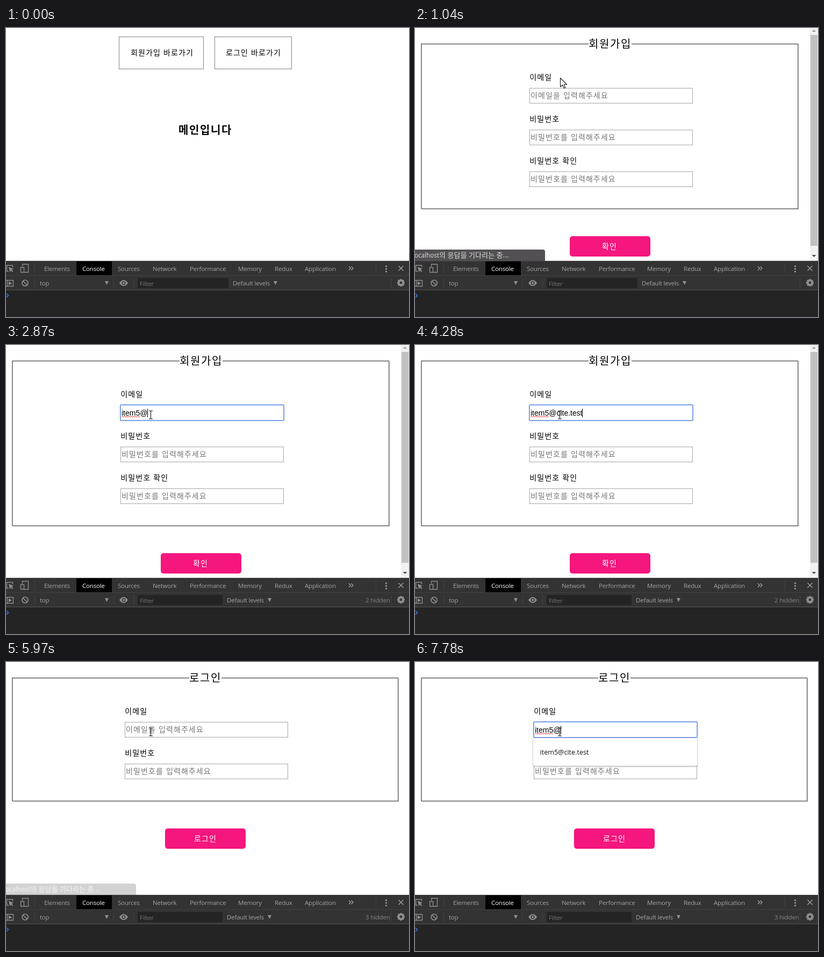
Animation of 750x540 px, one loop 8 s. Source, as an HTML page:

```html
<!DOCTYPE html>
<html lang="ko">
<head>
<meta charset="utf-8">
<style>
  html, body { margin: 0; width: 100%; height: 100%; overflow: hidden; background: #fff; }
  svg { display: block; }
  text { white-space: pre; }
  .ko { font-family: 'Noto Sans CJK KR', 'Noto Sans CJK', sans-serif; font-size: 14px; letter-spacing: 1.1px; }
  .big { font-size: 20px; letter-spacing: 1.6px; }
  .ui { font-family: 'Open Sans', 'Noto Sans', sans-serif; font-size: 11.5px; letter-spacing: -.2px; fill: #a3a3a3; }
  .item { font-family: 'Open Sans', 'Noto Sans', sans-serif; font-size: 12.6px; fill: #111; }
  .status { font-family: 'Open Sans', 'Noto Sans', sans-serif; font-size: 11.7px; fill: #dedede; }
  .status tspan { font-family: 'Noto Sans CJK KR', sans-serif; font-size: 13px; }
  .value { font-family: 'Liberation Sans', Arial, sans-serif; font-size: 14px; }
  .drop { filter: drop-shadow(0 1px 1.5px rgba(0,0,0,.4)); }
</style>
</head>
<body>
<svg width="750" height="540" viewBox="0 0 750 540">
  <g id="page"></g>
  <g id="tools"></g>
  <g id="pointer"></g>
</svg>
<script>
const LOOP = 8000;
const $ = id => document.getElementById(id);

// Markup helpers
const rect = (x, y, w, h, attrs) => `<rect x="${x}" y="${y}" width="${w}" height="${h}" ${attrs}/>`;
const frame = (x, y, w, h, color, attrs = '') =>
  rect(x + .5, y + .5, w - 1, h - 1, `fill="none" stroke="${color}" ${attrs}`);
const text = (x, y, str, cls, attrs = '') => `<text x="${x}" y="${y}" class="${cls}" ${attrs}>${str}</text>`;
const path = (d, attrs) => `<path d="${d}" ${attrs}/>`;

const pen = document.createElement('canvas').getContext('2d');
pen.font = "14px 'Liberation Sans', Arial, sans-serif";
const widthOf = str => pen.measureText(str).width;

// Timeline: each step patches the state from its time on
const typing = (before, chars, times) =>
  times.map((t, i) => [t, { value: before + chars.slice(0, i + 1), caret: 1 }]);
const USER = 'item5', HOST = 'cite.test';
const SAVED = ['demo4@cite.test', 'eee@nn.xx', 'rkvmsdhqt@sono.test', '456@ee.nn', 'demo@cite.test', 'wordly@river.test'];
const PAIR = ['item4@' + HOST, USER + '@' + HOST];
const WAITING = 'localhost<tspan>의 응답을 기다리는 중...</tspan>';

const fadeOut = (...times) => times.map((t, i) => [t, { fade: [.8, .5, .25, 0][i] }]);

const STEPS = [
  [0, { page: 'main', focus: -1, value: '', caret: 0, list: [], dots: [0, 0, 0], hidden: 0, status: '', fade: 0 }],
  [620, { status: 'localhost:3000/signup', fade: .4 }],
  [660, { fade: 1 }],
  [905, { page: 'signup', status: WAITING }],
  [1100, { hidden: 2 }],
  ...fadeOut(1105, 1135, 1170, 1200),
  [1250, { focus: 0, caret: 1 }],
  [1300, { list: SAVED }],
  [1660, { caret: 0 }],
  ...typing('', 'item', [1850, 1930, 2020, 2110]),
  [1870, { list: PAIR.slice(0, 1) }],
  [2400, { value: USER, list: [] }],
  [2740, { caret: 0 }],
  [2870, { value: USER + '@', caret: 1 }],
  [3220, { caret: 0 }],
  ...typing(USER + '@', HOST, [3480, 3570, 3660, 3740, 3830, 3990, 4090, 4180, 4280]),
  [4460, { focus: 1 }],
  [4600, { dots: [0, 1, 0] }],
  [4710, { focus: 2 }],
  [4820, { dots: [0, 1, 1] }],
  [4960, { focus: 3 }],
  [5700, { page: 'login', focus: -1, value: '', caret: 0, dots: [0, 0, 0] }],
  [5720, { status: WAITING, fade: 1 }],
  [5900, { hidden: 3 }],
  ...fadeOut(5901, 5935, 5970, 6000),
  [6220, { focus: 0, caret: 1 }],
  ...typing('', USER, [6570, 6670, 6760, 6870, 7080]),
  [6600, { list: PAIR }],
  [7170, { list: PAIR.slice(1) }],
  [7490, { caret: 0 }],
  [7780, { value: USER + '@', caret: 1 }],
].sort((a, b) => a[0] - b[0]);

let merged = {};
const STATES = STEPS.map(([time, patch]) => (merged = { ...merged, ...patch, time }));

// Pages
const linkBox = (x, w, label, tx) =>
  frame(x, 16, w, 61, '#000', 'stroke-dasharray="1 1"') + text(tx, 51, label, 'ko');

const mainPage = () =>
  linkBox(210, 158, '회원가입 바로가기', 232) + linkBox(388, 144, '로그인 바로가기', 409) +
  text(321, 198, '메인입니다', 'ko big', 'font-weight="700"');

const FORMS = {
  signup: { title: '회원가입', tx: 323, tw: 80, right: 714, x: 213, fields: ['이메일', '비밀번호', '비밀번호 확인'], button: '확인', bx: 348 },
  login: { title: '로그인', tx: 341, tw: 60, right: 731, x: 221, fields: ['이메일', '비밀번호'], button: '로그인', bx: 350 },
};

function field(s, x, label, i) {
  const y = 112 + 78 * i, focused = s.focus === i;
  const value = i ? '•'.repeat(s.dots[i]) : s.value;
  let out = text(x + .3, y - 15, label, 'ko') + frame(x, y, 304, 29, focused ? '#9bb8ec' : '#a5a5a5');
  if (focused) out += frame(x - 1, y - 1, 306, 31, '#5b8be0', 'rx="1"');
  out += value
    ? text(x + 2, y + 20, value, 'value')
    : text(x + 2, y + 19, (i ? '비밀번호를' : '이메일을') + ' 입력해주세요', 'ko', 'fill="#757575"');
  if (!i && value.includes('@')) {
    let zigzag = `M${x + 2} 135`;
    for (let k = 2; k <= 34; k += 2) zigzag += `L${x + 2 + k} ${k % 4 ? 133 : 135}`;
    out += path(zigzag, 'fill="none" stroke="#e33" stroke-width="1"');
  }
  if (focused && s.caret) out += rect(Math.floor(x + 2 + widthOf(value)), y + 7, 1, 16, '');
  return out;
}

function suggestions(list, x) {
  if (!list.length) return '';
  return rect(x - 1, 142, 305, 16 + 36 * list.length, 'rx="2" fill="#fff" class="drop"') +
    list.map((mail, i) => text(x + 11.5, 173 + 36 * i, mail, 'item')).join('');
}

const scrollbar = () =>
  rect(735, 0, 15, 435, 'fill="#f1f1f1"') + rect(736, 13, 13, 394, 'fill="#c1c1c1"') +
  path('M738.5 7l4-4 4 4z', 'fill="#a3a3a3"') + path('M738.5 424h8l-4 4z', 'fill="#505050"');

function formPage(s) {
  const f = FORMS[s.page], n = f.fields.length, w = f.right - 12, h = 78 * n + 75;
  const bx = f.x + 75, by = 155 + 78 * n;
  return frame(12, 30, w, h, '#a3a3a3') + frame(11, 29, w, h, '#6b6b6b') +
    rect(f.tx, 26, f.tw, 8, 'fill="#fff"') + text(f.tx, 37, f.title, 'ko big') +
    f.fields.map((label, i) => field(s, f.x, label, i)).join('') +
    rect(bx, by, 150, 38, 'rx="5" fill="#f5167e"') +
    (s.focus === 3 ? frame(bx - 1, by - 1, 152, 40, '#5b8be0', 'rx="5"') : '') +
    text(f.bx, by + 24, f.button, 'ko', 'fill="#fff"') +
    suggestions(s.list, f.x) + (s.page === 'signup' ? scrollbar() : '');
}

const statusBubble = s => s.fade
  ? `<g opacity="${s.fade}">${path('M0 414H238q4 0 4 4V435H0z', 'fill="#525052"')}${text(-4, 429, s.status, 'status')}</g>`
  : '';

// Developer tools
const TABS = [[71, 'Elements'], [142, 'Console'], [208, 'Sources'], [273, 'Network'], [342, 'Performance'],
  [432, 'Memory'], [500, 'Redux'], [556, 'Application']];

function icons() {
  const teeth = [0, 45, 90, 135].map(a => rect(733.2, 469, 3.6, 14, `fill="#919191" transform="rotate(${a} 735 476)"`)).join('');
  const dots = [445, 450, 455].map(y => `<circle cx="707.5" cy="${y}" r="1.6" fill="#a3a3a3"/>`).join('');
  const lines = 'fill="none" stroke="#919191" stroke-width="1.3"';
  return path('M5 454.5H1.5V443.500H12.500V447', lines) + path('M5 446.500l9 3.500-3.600 1.500 3 3-1.400 1.400-3-3-1.500 3.600z', 'fill="#919191"') +
    path('M30.500 446V441.500H41.500V456.500H34M27.500 447.500h6v9h-6z', lines) +
    path('M-2 471.500H13.500V482.500H-2M2.500 471V483', lines) + path('M5 473.500l6 3.500-6 3.500z', 'fill="#919191"') +
    `<circle cx="35.500" cy="476.500" r="5.500" fill="none" stroke="#919191" stroke-width="1.700"/>` +
    path('M31.500 472.500l8 8', 'stroke="#919191" stroke-width="1.700"') +
    path('M211 476.500q8-11 16 0q-8 11-16 0z', 'fill="#919191"') +
    '<circle cx="219" cy="476.500" r="3.500" fill="#333"/><circle cx="219" cy="476.500" r="2" fill="#919191"/>' +
    teeth + '<circle cx="735" cy="476" r="5.300" fill="#919191"/><circle cx="735" cy="476" r="2.400" fill="#333"/>' +
    dots + path('M730.500 444.500l9 9m0-9l-9 9', 'stroke="#a3a3a3" stroke-width="1.400"') +
    path('M638 445.500l3.500 3.500-3.500 3.500m4.500-7l3.500 3.500-3.500 3.500', 'fill="none" stroke="#a3a3a3" stroke-width="1.300"') +
    path('M1 496.500l3.500 3.500-3.500 3.500', 'fill="none" stroke="#367cf1" stroke-width="1.500"');
}

function devTools(hidden) {
  const shift = hidden ? -11 : 0;
  const arrow = x => path(`M${x} 473h7l-3.500 7z`, 'fill="#919191"');
  const dividers = [[53, 441], [688, 441], [53, 468], [200, 468], [237, 468], [716, 468]];
  return rect(0, 435, 750, 105, 'fill="#242424"') + rect(0, 435, 750, 55, 'fill="#333"') +
    rect(0, 435, 750, 1, 'fill="#484848"') + rect(0, 462, 750, 1, 'fill="#414141"') + rect(0, 489, 750, 1, 'fill="#555"') +
    rect(131, 436, 66, 26, 'fill="#000"') +
    dividers.map(([x, y]) => rect(x, y, 1, 17, 'fill="#444"')).join('') +
    TABS.map(([x, name]) => text(x, 454, name, 'ui', name === 'Console' ? 'style="fill:#fff"' : '')).join('') +
    text(63, 481, 'top', 'ui') + arrow(184) +
    rect(245, 467, 169 + shift, 19, 'fill="#242424"') + text(249, 482, 'Filter', 'ui', 'style="fill:#757575"') +
    text(422 + shift, 481, 'Default levels', 'ui') + arrow(498 + shift) +
    (hidden ? text(669, 481, hidden + ' hidden', 'ui', 'style="fill:#858585"') : '') + icons();
}

// Pointer
const TRACK = [[140, 330, 539], [300, 318, 380], [450, 292, 190], [600, 273, 74], [730, 270, 57],
  [840, 270, 58], [930, 270, 68], [1050, 270, 95], [1200, 269, 130]];
const CLICKS = [[820, 930], [1240, 1360]];
const OUTLINE = 'fill="#fff" stroke="#111" stroke-width="1.1" stroke-linejoin="round"';
const ARROW = path('M0 0V16.500L4 13l2.700 6 2.600-1.100L6.700 12H12z', OUTLINE);
const HAND = path('M-1.500 1.500Q0-.8 1.500 1.500V8Q3 6.500 4.500 8.300 6 7.200 7.400 9 9.500 8.500 10.800 10.500V16Q10.500 19 8.800 20.500V23.500H.500V21L-5.200 13.500Q-4.500 10.800-1.500 13z', OUTLINE) +
  path('M1.500 8v4M4.500 8.300v4M7.400 9v3.500', 'stroke="#111"');
const BEAM = path('M-3.500-7.500h2.500l1 1 1-1h2.500M0-7V7M-3.500 7.500h2.500l1-1 1 1h2.500', 'fill="none" stroke="#111" stroke-width="1.100"');

function pointer(t, page) {
  if (t < TRACK[0][0]) return '';
  let [, x, y] = TRACK[TRACK.length - 1];
  const next = TRACK.findIndex(p => p[0] > t);
  if (next > 0) {
    const a = TRACK[next - 1], b = TRACK[next], k = (t - a[0]) / (b[0] - a[0]);
    x = a[1] + (b[1] - a[1]) * k;
    y = a[2] + (b[2] - a[2]) * k;
  }
  const shape = page === 'main' ? (y < 77 ? HAND : ARROW) : (y > 112 ? BEAM : ARROW);
  const ring = CLICKS.some(([from, to]) => t >= from && t < to)
    ? '<circle cx="-2" cy="-1" r="11" fill="#f7ee20" opacity=".7"/>' : '';
  return `<g transform="translate(${Math.round(x) + .5} ${Math.round(y) + .5})">${ring}${shape}</g>`;
}

let shown, hiddenShown;
function draw(t) {
  const s = STATES.filter(state => state.time <= t).pop();
  if (s !== shown) {
    $('page').innerHTML = (s.page === 'main' ? mainPage() : formPage(s)) + statusBubble(s);
    if (s.hidden !== hiddenShown) $('tools').innerHTML = devTools(hiddenShown = s.hidden);
    shown = s;
  }
  $('pointer').innerHTML = pointer(t, s.page);
}

const start = performance.now();
function tick() {
  draw((performance.now() - start) % LOOP);
  requestAnimationFrame(tick);
}
tick();
</script>
</body>
</html>
```
